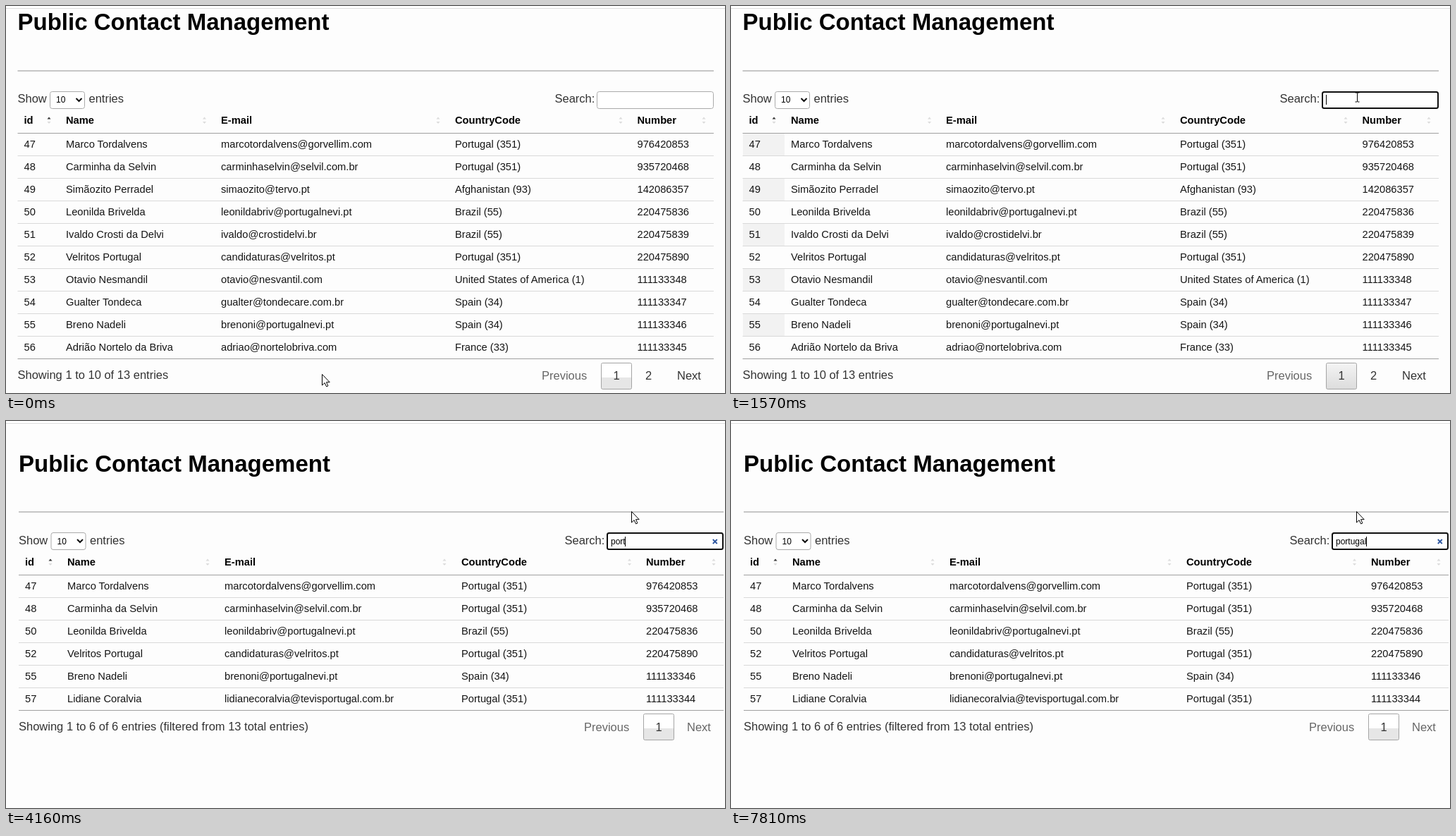
Recreate the animation shown at these times as an HTML page. Size 1020x549 px, loop 8000 ms.

```html
<!DOCTYPE html>
<html lang="en">
<head>
<meta charset="utf-8">
<title>Public Contact Management</title>
<style>
  html, body { margin: 0; width: 100%; height: 100%; overflow: hidden; background: #fdfdfd; }
  svg { display: block; }
  text { font: 14.7px "Liberation Sans", Arial, sans-serif; fill: #151515; white-space: pre; }
  .title { font-size: 33px; font-weight: bold; fill: #000; }
  .head { font-weight: bold; fill: #000; }
  .label { font-size: 16.5px; fill: #333; }
  .muted { font-size: 16.5px; fill: #666; }
  .field { font-size: 12px; fill: #000; }
  .box { fill: #fff; stroke: #aaa; }
</style>
</head>
<body>
<svg width="1020" height="549" viewBox="0 0 1020 549">
  <defs>
    <linearGradient id="split" x2="0" y2="1">
      <stop offset=".56" stop-color="#fff"/><stop offset=".56" stop-color="#e6e6e6"/>
      <stop offset="1" stop-color="#e6e6e6"/>
    </linearGradient>
    <linearGradient id="smooth" x2="0" y2="1">
      <stop stop-color="#f4f4f4"/><stop offset="1" stop-color="#dcdcdc"/>
    </linearGradient>
  </defs>
  <rect width="1020" height="3" fill="#fff"/>
  <rect y="3" width="1020" height="1" fill="#dedede"/>
  <g id="full"></g>
  <g id="filtered" transform="translate(0 38)"></g>
  <g id="search">
    <g id="frame">
      <rect x="839" y="122" width="164" height="23" rx="2.5" fill="#fff" stroke="#101010" stroke-width="2"/>
      <path id="clear" d="M988.8 131l6 6m0-6l-6 6" stroke="#2c559f" stroke-width="1.8"/>
    </g>
    <text id="typed" class="field" x="844" y="137"></text>
    <path id="squiggle" fill="none" stroke="#e03030"/>
    <rect id="caret" y="126" width="1" height="14"/>
  </g>
  <path id="arrow" d="M.5.5V16l3.6-3.4 2.5 5.3 2.3-1-2.4-5.2h4.7z" fill="#fff" stroke="#000"/>
  <path id="beam" d="M-3-6.5h2.5l.5.5.5-.5H3M-3 6.5h2.5L0 6l.5.5H3M0-6V6" fill="none" stroke="#000"/>
</svg>
<script>
const $ = id => document.getElementById(id);
const LOOP = 8000;
const LIFT = 1; // boxes round to one pixel higher once the page has scrolled

const contacts = [
  ['Marco Tordalvens', 'marcotordalvens@gorvellim.com', 'Portugal (351)', '976420853'],
  ['Carminha da Selvin', 'carminhaselvin@selvil.com.br', 'Portugal (351)', '935720468'],
  ['Simãozito Perradel', 'simaozito@tervo.pt', 'Afghanistan (93)', '142086357'],
  ['Leonilda Brivelda', 'leonildabriv@portugalnevi.pt', 'Brazil (55)', '220475836'],
  ['Ivaldo Crosti da Delvi', 'ivaldo@crostidelvi.br', 'Brazil (55)', '220475839'],
  ['Velritos Portugal', 'candidaturas@velritos.pt', 'Portugal (351)', '220475890'],
  ['Otavio Nesmandil', 'otavio@nesvantil.com', 'United States of America (1)', '111133348'],
  ['Gualter Tondeca', 'gualter@tondecare.com.br', 'Spain (34)', '111133347'],
  ['Breno Nadeli', 'brenoni@portugalnevi.pt', 'Spain (34)', '111133346'],
  ['Adrião Nortelo da Briva', 'adriao@nortelobriva.com', 'France (33)', '111133345'],
  ['Lidiane Coralvia', 'lidianecoralvia@tevisportugal.com.br', 'Portugal (351)', '111133344'],
].map((c, i) => [47 + i, ...c]);

const text = (cls, x, y, s, extra = '') => `<text class="${cls}" x="${x}" y="${y}" ${extra}>${s}</text>`;
const line = (x1, x2, y, color) => `<rect x="${x1}" y="${y}" width="${x2 - x1}" height="1" fill="${color}"/>`;

function sortIcon(x, active) {
  return `<path d="M${x - 2.5} 160.5l2.5-3 2.5 3z" fill="${active ? '#333' : '#dcdcdc'}"/>
    <path d="M${x - 2.5} 164l2.5 3 2.5-3z" fill="#dcdcdc"/>`;
}

function page({ rows, left, right, cols, icons, info, prevX, pages, nextClass, lift }) {
  const heads = ['id', 'Name', 'E-mail', 'CountryCode', 'Number'];
  const end = 180 + rows.length * 32, y = end + 30, b = prevX + 84;
  const boxes = line(left, right, 91.5, '#8f8f8f')
    + `<rect class="box" x="${left + 46}" y="121.5" width="49" height="24" rx="3"/>`
    + `<path d="M${left + 83} 131l4 4 4-4" fill="none" stroke="#111" stroke-width="2"/>`
    + `<rect class="box" x="${right - 165.5}" y="121.5" width="165" height="24" rx="3"/>`
    + `<rect class="current" x="${b + .5}" y="${end + 6.5}" width="43" height="37" rx="2" fill="url(#split)" stroke="#a5a5a5"/>`;
  let s = `<g transform="translate(0 ${-lift})">${boxes}</g>`
    + text('title', left, 34, 'Public Contact Management')
    + text('label', left, 137, 'Show')
    + text('field', left + 54.5, 137, '10')
    + text('label', left + 101, 137, 'entries')
    + text('label', right - 225.5, 137, 'Search:');
  heads.forEach((h, i) => s += text('head', cols[i], 167, h) + sortIcon(icons[i], !i));
  rows.forEach((row, i) => {
    const top = 180 + i * 32;
    if (i) s += line(left, right, top, '#d9d9d9');
    row.forEach((cell, j) => s += text('', cols[j], top + 21, cell));
  });
  return s + line(left, right, 180, '#a0a0a0') + line(left, right, end, '#a0a0a0')
    + text('label', left, y - 1, info)
    + text('muted', prevX, y, 'Previous')
    + text('label', b + 22, y, '1', 'text-anchor="middle"')
    + (pages > 1 ? text('label', b + 67.5, y, '2', 'text-anchor="middle"') : '')
    + text(nextClass, right - 52, y, 'Next');
}

// Shading of the sorted column on odd rows, by the time each appears
const stripeTimes = [910, 650, 650, 650, 1570];
const stripes = stripeTimes.map((_, i) =>
  `<rect class="stripe" x="17" y="${181 + i * 64}" width="59" height="31" fill="#f2f2f2"/>`).join('');

$('full').innerHTML = stripes + page({
  rows: contacts.slice(0, 10), left: 16.5, right: 1004,
  cols: [25.5, 85, 305, 637, 895.5], icons: [61, 281.5, 613, 872, 990],
  info: 'Showing 1 to 10 of 13 entries', prevX: 760, pages: 2, nextClass: 'label', lift: 0,
});
$('filtered').innerHTML = page({
  rows: contacts.filter(c => c.join().toLowerCase().includes('portugal')), left: 18, right: 1018,
  cols: [27, 87, 310, 646, 908], icons: [63, 286, 622, 884.5, 1004],
  info: 'Showing 1 to 6 of 6 entries (filtered from 13 total entries)',
  prevX: 820, pages: 1, nextClass: 'muted', lift: LIFT,
});
$('squiggle').setAttribute('d', 'M844 139.5' + 'l2-2 2 2'.repeat(7));

// [time, pointer, x, y]
const pointer = [
  [0, 'arrow', 448, 522], [650, 'arrow', 960, 390], [770, 'arrow', 930, 245],
  [910, 'arrow', 878, 188], [1060, 'arrow', 838, 166], [1180, 'arrow', 798, 142],
  [1300, 'beam', 885.5, 132], [1450, 'beam', 888.5, 129.5], [2380, 'beam', 889.5, 129.5],
  [2790, 'arrow', 887, 128],
];
// [time, letters typed, caret visible]
const typing = [
  [0, 0, 0], [1570, 0, 1], [2130, 0, 0], [2660, 0, 1], [2790, 2, 1], [3350, 2, 0],
  [3910, 3, 1], [4160, 4, 1], [4690, 4, 0], [4810, 5, 1], [5370, 5, 0], [5890, 5, 1],
  [6350, 5, 0], [6600, 6, 1], [6750, 7, 1], [7130, 7, 0], [7690, 7, 1], [7810, 8, 1],
];
const at = (keys, t) => keys.findLast(k => k[0] <= t);
const show = (el, on) => el.style.display = on ? '' : 'none';
const move = (id, x, y) => $(id).setAttribute('transform', `translate(${x} ${y})`);
const stripeEls = document.querySelectorAll('.stripe');
const current = document.querySelector('#full .current');

function draw(t) {
  const filtered = t >= 2790, focused = t >= 1570;
  show($('full'), !filtered);
  show($('filtered'), filtered);
  stripeEls.forEach((el, i) => show(el, t >= stripeTimes[i]));
  current.setAttribute('fill', focused ? 'url(#smooth)' : 'url(#split)');

  const [, count, caretOn] = at(typing, t);
  show($('search'), focused);
  move('search', filtered ? 14 : 0, filtered ? 38 : 0);
  move('frame', 0, filtered ? -LIFT : 0);
  $('typed').textContent = 'portugal'.slice(0, count);
  const width = count && focused ? $('typed').getComputedTextLength() : 0;
  $('caret').setAttribute('x', Math.floor(844.3 + width));
  show($('caret'), caretOn);
  show($('clear'), filtered);
  show($('squiggle'), t >= 5770 && t < 6600);

  const [, kind, x, y] = at(pointer, t);
  for (const id of ['arrow', 'beam']) {
    show($(id), id === kind);
    move(id, x, y);
  }
}

function tick() {
  draw(performance.now() % LOOP);
  requestAnimationFrame(tick);
}
tick();
</script>
</body>
</html>
```
